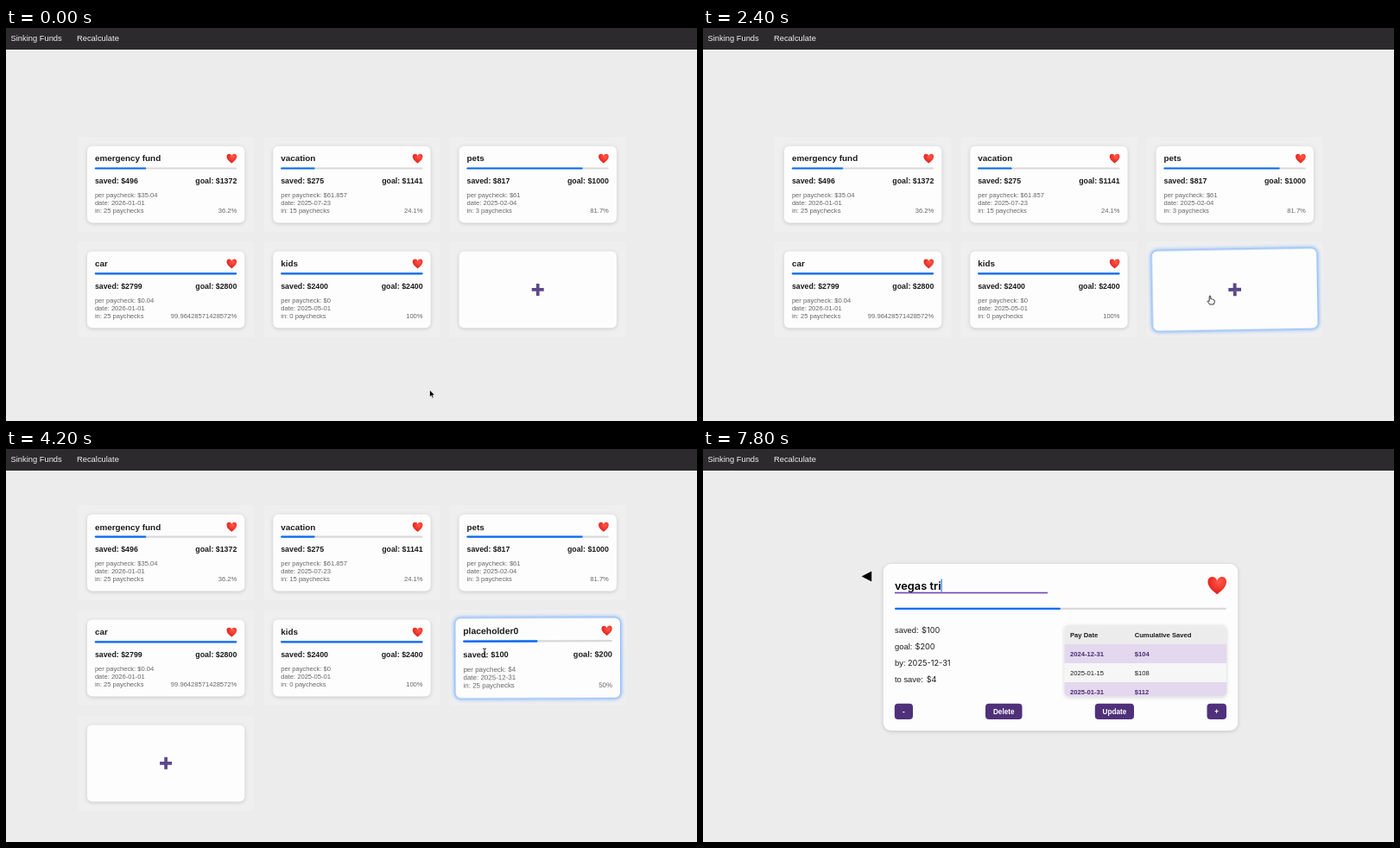
An HTML page for the animation above (8 s loop, 800 px wide and 455 px high).

```html
<!DOCTYPE html>
<html lang="en">
<head>
<meta charset="utf-8">
<title>Sinking Funds</title>
<style>
  html, body { margin: 0; width: 100%; height: 100%; overflow: hidden; background: #ececec; }
  svg { display: block; width: 800px; height: 455px; }
  text { font-family: "Liberation Sans", Arial, sans-serif; fill: #1c1c1e; white-space: pre; }
  .nav { font-size: 9.35px; fill: #f0f0f0; }
  .name { font-size: 9.9px; font-weight: bold; }
  .sum { font-size: 8.8px; font-weight: bold; }
  .note { font-size: 7.6px; fill: #666; }
  .label { font-size: 9.4px; }
  .input { font-size: 9.2px; font-family: Inter, sans-serif; }
  .title { font-size: 12.8px; font-weight: 600; font-family: Inter, sans-serif; fill: #000; }
  .cell { font-size: 7.65px; }
  .bold { font-weight: bold; }
  .due { font-weight: bold; fill: #4d2c75; }
  .button { font-size: 8.2px; font-weight: bold; fill: #fff; }
  .end { text-anchor: end; }
  .mid { text-anchor: middle; }
  .face { fill: #fdfdfd; filter: drop-shadow(0 1px 2px rgba(0,0,0,.17)); }
  .lit { fill: #fdfdfd; stroke: #93bffa; stroke-width: 1; filter: drop-shadow(0 0 2.5px rgba(30,125,255,.65)); }
</style>
</head>
<body>
<svg id="stage" viewBox="0 0 800 455"></svg>
<script>
const LOOP = 8000, STEP = 200;
const ADD_AT = 2600, OPEN_AT = 4800, SELECT_AT = 6200, TYPE_AT = 6400;
const stage = document.getElementById('stage');

const funds = [
  { name: 'emergency fund', saved: 496, goal: 1372, per: '35.04', date: '2026-01-01', left: 25, pct: '36.2' },
  { name: 'vacation', saved: 275, goal: 1141, per: '61.857', date: '2025-07-23', left: 15, pct: '24.1' },
  { name: 'pets', saved: 817, goal: 1000, per: '61', date: '2025-02-04', left: 3, pct: '81.7' },
  { name: 'car', saved: 2799, goal: 2800, per: '0.04', date: '2026-01-01', left: 25, pct: '99.96428571428572' },
  { name: 'kids', saved: 2400, goal: 2400, per: '0', date: '2025-05-01', left: 0, pct: '100' },
  { name: 'placeholder0', saved: 100, goal: 200, per: '4', date: '2025-12-31', left: 25, pct: '50' }
];

// start, end, card index
const hovers = [[1000, ADD_AT, 5], [2900, 3800, 4], [4000, OPEN_AT, 5]];

// time, x, y, shape
const pointer = [
  [0, 490.5, 419, 'arrow'], [400, 500, 409, 'arrow'], [1000, 568, 336, 'hand'],
  [1400, 586.5, 314, 'hand'], [1600, 587, 314, 'hand'], [2400, 588, 315, 'hand'],
  [2600, 588, 315, 'arrow'], [3000, 437, 244.5, 'arrow'], [3500, 433, 243, 'arrow'],
  [4000, 545, 236, 'beam'], [4200, 554, 236, 'beam'], [4800, 553, 236, 'arrow'],
  [5400, 330, 148, 'beam'], [5800, 294, 154, 'beam'], [SELECT_AT, 294, 154, 'beam']
];

const shapes = {
  arrow: '<path d="M0 0V8.2L1.9 6.5L3.2 9.4L4.6 8.8L3.4 6H5.9Z" fill="#000" stroke="#fff" stroke-width=".6"/>',
  hand: `<path d="M-1.8 .7V-4Q-1.8 -5-1-5T-.2 -4V-1.3Q1-1.9 1.6-.9Q2.7-1.3 3.1-.3Q4.3-.4 4.3 .8
    Q4.3 3 3.2 5H-1.5Q-2.3 3.4-3.9 1.6Q-4 .2-1.8 1.4Z" fill="#fff" stroke="#222" stroke-width=".9"/>`,
  beam: '<path d="M-2-5Q0-5 0-4Q0-5 2-5M0-4V4M-2 5Q0 5 0 4Q0 5 2 5M-1 1.5H1" fill="none" stroke="#222" stroke-width="1"/>'
};

const text = (x, y, s, cls) => `<text x="${x}" y="${y}" class="${cls}">${s}</text>`;
const rect = (x, y, w, h, fill, r = 0) =>
  `<rect x="${x}" y="${y}" width="${w}" height="${h}" rx="${r}" fill="${fill}"/>`;
const heart = (x, y, size) =>
  `<path transform="translate(${x} ${y}) scale(${size / 24})" fill="url(#red)"
    d="M12 23C7 19 .5 14 .5 7.5C.5 3.8 3 1.5 6 1.5C9 1.5 11 3.2 12 6C13 3.2 15 1.5 18 1.5C21 1.5 23.5 3.8 23.5 7.5C23.5 14 17 19 12 23Z"/>`;
const bar = (x, y, w, h, pct) =>
  rect(x, y, w, h, '#d9d9db', h / 2) + rect(x, y, w * pct / 100, h, '#086cf2', h / 2);

const defs = `<defs>
  <radialGradient id="red" cx=".62" cy=".3" r=".75">
    <stop offset="0" stop-color="#ff5a4c"/><stop offset=".55" stop-color="#f2352b"/><stop offset="1" stop-color="#cf1d1a"/>
  </radialGradient>
  <clipPath id="table"><rect x="418.5" y="204" width="187.5" height="82.5" rx="5"/></clipPath>
</defs>`;

function fundContent(f) {
  return text(9, 17.8, f.name, 'name') + heart(161.3, 8.3, 12.2) +
    bar(8.8, 24.7, 164.6, 2.2, f.pct) +
    text(9, 43.4, `saved: $${f.saved}`, 'sum') + text(173.4, 43.4, `goal: $${f.goal}`, 'sum end') +
    text(9, 59.4, `per paycheck: $${f.per}`, 'note') + text(9, 68.2, `date: ${f.date}`, 'note') +
    text(9, 77, `in: ${f.left} paychecks`, 'note') + text(173.4, 77, `${f.pct}%`, 'note end');
}

const plus = '<path d="M84.2 44.4H98.2M91.2 37.4V51.4" stroke="#5c4789" stroke-width="3.7"/>';

function card(i, content, top, hover, t) {
  const x = 93.9 + i % 3 * 215.3, y = top + Math.floor(i / 3) * 121.8;
  const tilt = hover ? -Math.min(1, (t - hover[0]) / 1000) : 0;
  const pose = hover ? `translate(91.2 44.4) rotate(${tilt}) scale(1.05) translate(-91.2 -44.4)` : '';
  return `<g transform="translate(${x} ${y})">${rect(-11, -10.8, 204.5, 110.4, '#efefef', 4)}
    <g transform="${pose}"><rect width="182.4" height="88.8" rx="6" class="${hover ? 'lit' : 'face'}"/>${content}</g></g>`;
}

function overview(t) {
  const shown = t < ADD_AT ? funds.slice(0, 5) : funds;
  const top = t < ADD_AT ? 136.7 : 75.8;
  const hover = hovers.find(([from, to]) => t >= from && t < to);
  return [...shown.map(fundContent), plus]
    .map((content, i) => card(i, content, top, hover && hover[2] === i ? hover : null, t)).join('');
}

function details(t) {
  const typed = Math.floor((t - TYPE_AT) / STEP) + 1;
  const title = t < TYPE_AT ? 'placeholder0' : 'vegas tri'.slice(0, typed < 8 ? typed : 9);
  const fields = [['saved:', '$100', 253], ['goal:', '$200', 245.5], ['by:', '2025-12-31', 237], ['to save:', '$4', 258.7]];
  const rows = [
    ['Pay Date', 'Cumulative Saved', '#ececec', 'bold'], ['2024-12-31', '$104', '#e3d8ee', 'due'],
    ['2025-01-15', '$108', '#f6f6f6', ''], ['2025-01-31', '$112', '#e3d8ee', 'due']
  ];
  const buttons = [[221.8, 21.2, '-'], [327, 42.5, 'Delete'], [453.8, 45.2, 'Update'], [583.5, 22.5, '+']];
  return '<path d="M183.6 147.5L195.2 141.6V153.4Z"/>' +
    '<rect x="208.8" y="133" width="410.4" height="193" rx="9" class="face"/>' +
    '<rect id="mark" y="150.5" height="15" fill="none"/>' +
    `<text id="title" x="222" y="162.6" class="title">${title}</text>` +
    rect(222, 165.7, 177, 1.6, '#6a45b5') + heart(584, 146.6, 22.5) + bar(222, 183.7, 384, 2.3, 50) +
    fields.map(([label, value, x], i) => text(222, 213.4 + 19 * i, label, 'label') + text(x, 212.9 + 19 * i, value, 'input')).join('') +
    '<rect x="418.5" y="204" width="187.5" height="82.5" rx="5" class="face"/><g clip-path="url(#table)">' +
    rows.map(([date, sum, fill, cls], i) => rect(418, 204 + 22 * i, 189, 22, fill) +
      text(425, 217.7 + 22 * i, date, 'cell ' + cls) + text(499.7, 217.7 + 22 * i, sum, 'cell ' + cls)).join('') + '</g>' +
    buttons.map(([x, w, s]) => rect(x, 294.7, w, 18.3, '#50307a', 4) + text(x + w / 2, 307, s, 'button mid')).join('');
}

function placeMark(t) {
  if (t < SELECT_AT) return;
  const mark = document.getElementById('mark');
  const width = document.getElementById('title').getComputedTextLength();
  const typing = t >= TYPE_AT;
  mark.setAttribute('x', typing ? 222 + width : 222);
  mark.setAttribute('width', typing ? 1.2 : width);
  mark.setAttribute('fill', typing ? '#1f78f0' : '#b5d5fb');
}

function cursor(t) {
  if (t >= TYPE_AT) return '';
  const i = pointer.findLastIndex(p => p[0] <= t);
  const a = pointer[i], b = pointer[i + 1] || a;
  const k = b === a ? 0 : (t - a[0]) / (b[0] - a[0]);
  return `<g transform="translate(${a[1] + (b[1] - a[1]) * k} ${a[2] + (b[2] - a[2]) * k})">${shapes[a[3]]}</g>`;
}

let last = -1;
function draw(now) {
  const t = Math.floor(now % LOOP / STEP) * STEP;
  if (t !== last) {
    last = t;
    stage.innerHTML = defs + rect(0, 0, 800, 455, '#ececec') + rect(0, 0, 800, 25, '#2c2a2c') +
      text(5.5, 15.2, 'Sinking Funds', 'nav') + text(82, 15.2, 'Recalculate', 'nav') +
      (t < OPEN_AT ? overview(t) : details(t)) + cursor(t);
    if (t >= OPEN_AT) placeMark(t);
  }
  requestAnimationFrame(() => draw(performance.now() - start));
}
const start = performance.now();
draw(0);
</script>
</body>
</html>
```
